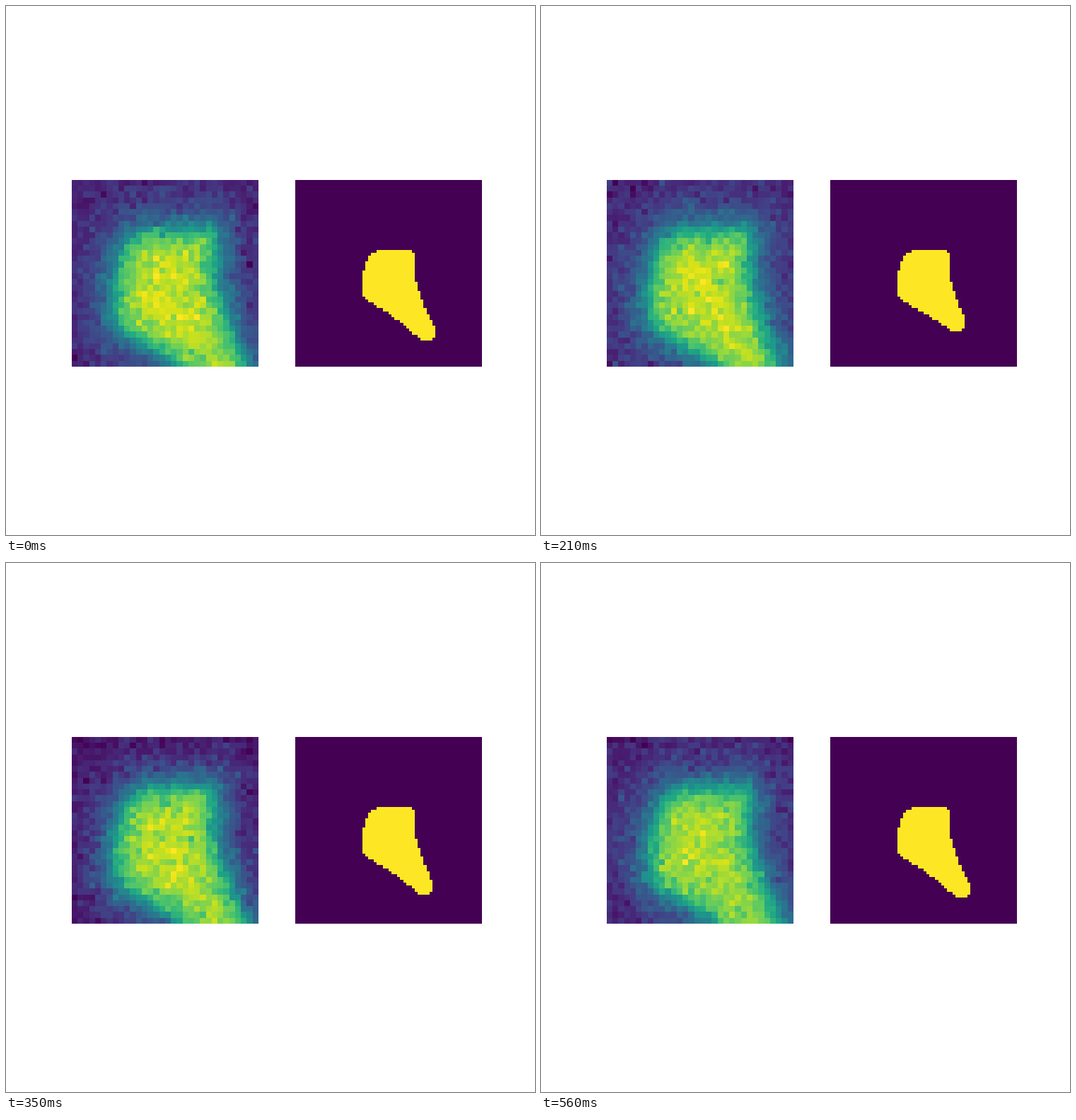
A matplotlib script for the animation above (630 ms loop, 748 px wide and 748 px high).

```python
import numpy as np
import matplotlib.pyplot as plt
from matplotlib.animation import FuncAnimation

STAGE, DPI = 748, 100
INTERVAL = 70
CROP, FULL = 32, 64                          # cells across the two panels
PAD = (FULL - CROP) // 2
TIP_ROWS = [55, 54, 53, 52, 53, 54, 54, 53, 55]   # how far down the tail reaches


def outline(tip):
    """Key points of the blob; the tail narrows as it retracts."""
    back = 55 - tip
    right, left = 48 - .8 * back, 43 - .6 * back
    return np.array([
        (28.6, 24.2), (40.2, 24.2), (41, 25.2), (41, 33.2), (43.5, 41.2),
        (45.5, 45.8), (right, tip - 3.5), (right, tip - 1.3),
        (right - 1.1, tip - .4), (left, tip - .4), (32.2, 45.6),
        (24.7, 41.4), (22.9, 39), (22.9, 33.5), (24.4, 28), (26, 25.8)])


def depth(points, poly):
    """Signed distance to a polygon, positive inside."""
    edge = np.roll(poly, -1, axis=0) - poly
    rel = points[..., None, :] - poly
    t = np.clip((rel * edge).sum(-1) / (edge ** 2).sum(-1), 0, 1)
    dist = np.linalg.norm(rel - t[..., None] * edge, axis=-1).min(-1)
    dx, dy = rel[..., 0], rel[..., 1]
    spans = (dy < 0) != (dy < edge[:, 1])
    left_of = dx < dy * edge[:, 0] / np.where(edge[:, 1] == 0, 1, edge[:, 1])
    inside = (spans & left_of).sum(-1) % 2 == 1
    return np.where(inside, dist, -dist)


def glow(d):
    """Brightness that fades outside the outline and saturates inside."""
    return np.where(d < 0, .49 * np.exp(np.minimum(d, 0) / 3.3),
                    1 - .51 * np.exp(-np.maximum(d, 0) / 2.4))


def noisy_crop(field, seed):
    mid = slice(PAD, PAD + CROP)
    above = slice(PAD - 1, PAD + CROP - 1)
    # The glow sags one row below the outline
    light = glow(np.maximum(field[mid, mid], field[above, mid]))
    noise = np.random.default_rng(seed).normal(size=light.shape)
    img = light + noise * (.048 + .01 * light)
    return (img - img.min()) / np.ptp(img)


def add_panel(x, y, size, cells):
    ax = fig.add_axes([x / STAGE, y / STAGE, size / STAGE, size / STAGE])
    ax.axis("off")
    return ax.imshow(np.zeros((cells, cells)), cmap="viridis", vmin=0, vmax=1,
                     interpolation="nearest", aspect="auto")


fig = plt.figure(figsize=(STAGE / DPI, STAGE / DPI), dpi=DPI)
photo = add_panel(93.1, 238.1, 263.7, CROP)
mask = add_panel(409.1, 238.1, 263.7, FULL)
centres = np.stack(np.meshgrid(np.arange(FULL), np.arange(FULL)), -1) + .5


def update(i):
    field = depth(centres, outline(TIP_ROWS[i]))
    photo.set_data(noisy_crop(field, i))
    mask.set_data(field > 0)
    return photo, mask


anim = FuncAnimation(fig, update, frames=len(TIP_ROWS), interval=INTERVAL,
                     repeat=True, repeat_delay=0)
plt.show()
```
